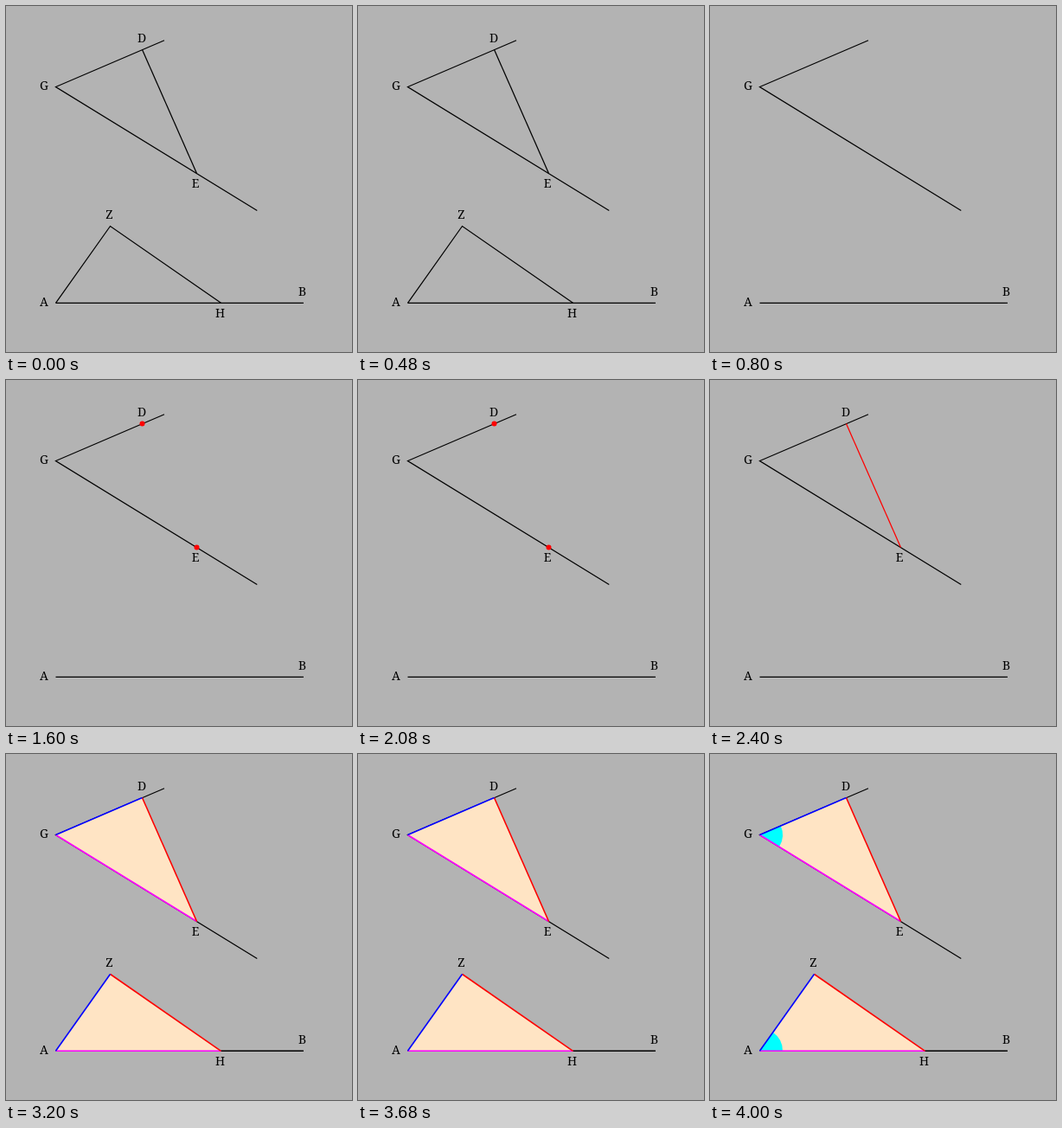
Recreate the animation shown at these times as an HTML page with a canvas. Size 400 by 400 pixels, loop 4.8 s.

```html
<!DOCTYPE html>
<html lang="en">
<head>
<meta charset="utf-8">
<title>Copying an angle</title>
<style>
  html, body { margin: 0; width: 100%; height: 100%; overflow: hidden; background: #b3b3b3; }
  canvas { display: block; }
</style>
</head>
<body>
<canvas id="stage" width="400" height="400"></canvas>
<script>
const ctx = document.getElementById('stage').getContext('2d');
const STEP = 800, STEPS = 6;

const G = [57.5, 93.5], D = [157.5, 50.5], E = [220.5, 193.5];
const A = [57.5, 343.3], Z = [120.5, 254.5], H = [248.5, 343.3], B = [344, 343.3];
const rayD = [183, 39.7], rayE = [290.3, 236.5];

// Label centre and baseline
const labels = {
  G: [44, 97], A: [44, 347], B: [342.5, 335],
  D: [157, 42], E: [219, 210], Z: [119.5, 246], H: [247.5, 360]
};

function path(points, color = '#000', width = 1.25) {
  ctx.beginPath();
  points.forEach(p => ctx.lineTo(...p));
  ctx.strokeStyle = color;
  ctx.lineWidth = width;
  ctx.stroke();
}

function dot([x, y]) {
  ctx.beginPath();
  ctx.arc(x, y, 3, 0, 2 * Math.PI);
  ctx.fillStyle = '#f00';
  ctx.fill();
}

function wedge(apex, from, to) {
  const heading = p => Math.atan2(p[1] - apex[1], p[0] - apex[0]);
  ctx.beginPath();
  ctx.moveTo(...apex);
  ctx.arc(...apex, 26.5, heading(from), heading(to));
  ctx.fillStyle = '#0ff';
  ctx.fill();
}

function triangle(apex, top, end, withAngle) {
  ctx.beginPath();
  [apex, top, end].forEach(p => ctx.lineTo(...p));
  ctx.fillStyle = '#ffe4c4';
  ctx.fill();
  if (withAngle) wedge(apex, top, end);
  path([apex, end], '#f0f', 1.6);
  path([top, end], '#f00', 1.6);
  path([apex, top], '#00f', 1.6);
}

function write(names) {
  ctx.font = '14px "Noto Serif", serif';
  ctx.textAlign = 'center';
  ctx.fillStyle = '#000';
  for (const name of names) ctx.fillText(name, ...labels[name]);
}

function draw(step) {
  const colored = step >= 4;
  ctx.fillStyle = '#b3b3b3';
  ctx.fillRect(0, 0, 400, 400);
  path([rayD, G, rayE]);
  path([A, B], '#000', colored ? 1.6 : 1.25);

  if (step === 0) {
    path([D, E]);
    path([A, Z, H]);
  }
  if (step === 2) [D, E].forEach(dot);
  if (step === 3) path([D, E], '#f00');
  if (colored) {
    triangle(G, D, E, step === 5);
    triangle(A, Z, H, step === 5);
  }

  write('GAB');
  if (step !== 1) write('DE');
  if (step === 0 || colored) write('ZH');
}

const start = performance.now();
function tick() {
  draw(Math.floor((performance.now() - start) / STEP) % STEPS);
  requestAnimationFrame(tick);
}
tick();
</script>
</body>
</html>
```
